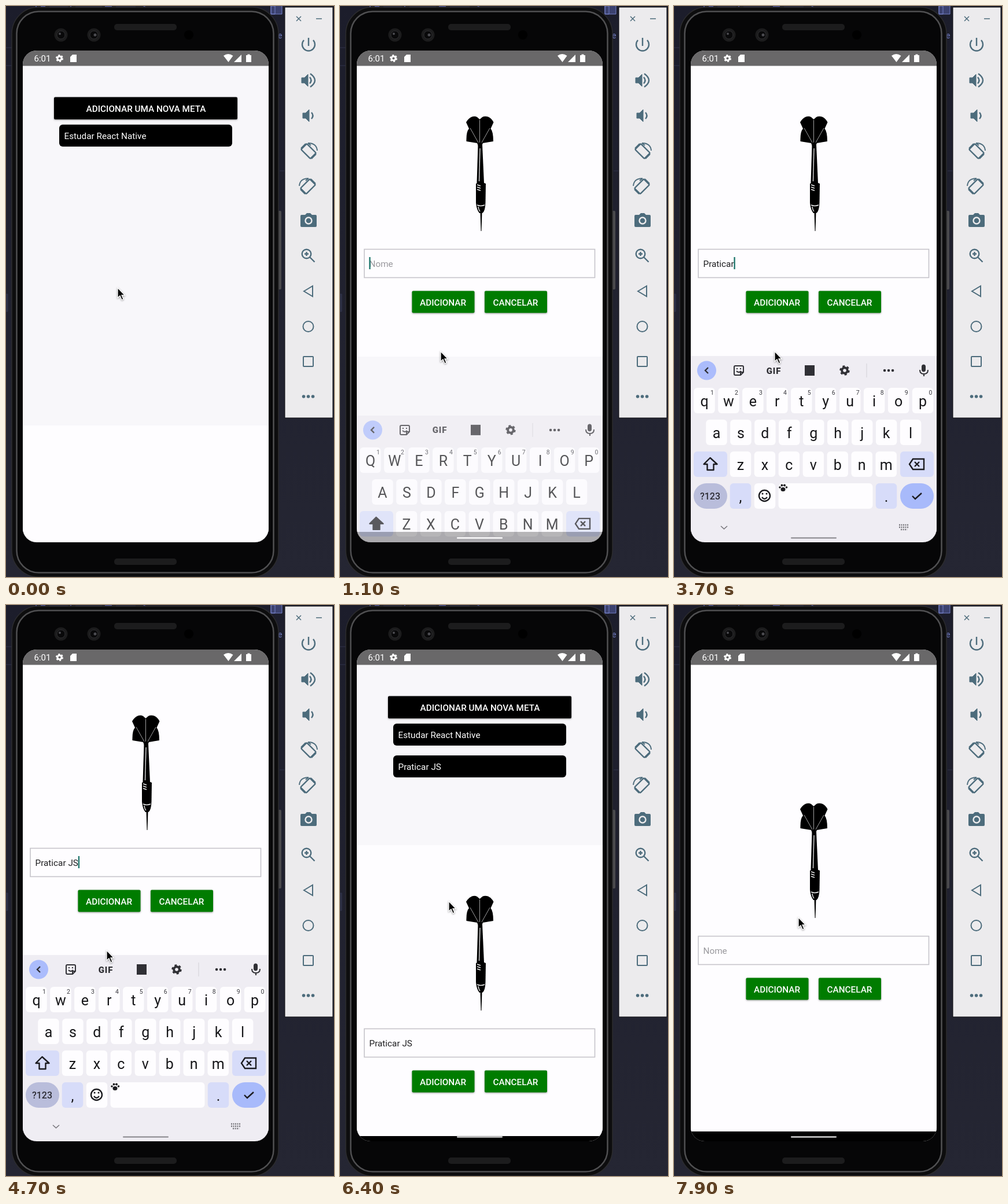
An HTML page for the animation above (8000 ms loop, 567 px wide and 987 px high).

```html
<!DOCTYPE html>
<html lang="pt">
<head>
<meta charset="utf-8">
<style>
html,body{margin:0;width:100%;height:100%;overflow:hidden;background:#20212e}
svg{display:block;width:567px;height:987px;font:15.3px Roboto,sans-serif}
text{white-space:pre}
.mid{text-anchor:middle}
.btn{font-weight:500;fill:#fff;text-anchor:middle}
.line{fill:none;stroke-width:2.4}
.thin{stroke-width:2}
.shade{filter:drop-shadow(0 1px 1.5px #0006)}
</style>
</head>
<body>
<svg viewBox="0 0 567 987">
<defs>
  <clipPath id="glass"><rect x="29" y="77" width="425" height="850" rx="24"/></clipPath>
  <linearGradient id="desk" x2="0" y2="1"><stop stop-color="#1c1d2b"/><stop offset="1" stop-color="#252633"/></linearGradient>
  <g id="gear"><circle r="4.8" fill="none" stroke-width="4"/><circle r="7.4" fill="none" stroke-width="2.6" stroke-dasharray="3.9 3.85"/></g>
  <g id="turn" class="line">
    <rect x="-7" y="-11.500" width="14" height="23" rx="2" transform="rotate(-45)"/>
    <path d="M-12.500-4.500l8-8M4.500 12.500l8-8" stroke-width="3.500"/>
    <path d="M-1-14Q14-14 15-1M-1-14l5 4" stroke-width="1.800"/>
  </g>
</defs>

<!-- desktop and phone body -->
<rect width="567" height="987" fill="url(#desk)"/>
<path d="M0 72H10M0 103H10M0 498H3V528H0M473 285h9" stroke="#30334a" fill="#2b2e42"/>
<path d="M52 0v3M60 1h8M75 2h32M112 0v3M120 2h46M171 1h12M190 2h34M238 0l4 3" stroke="#4c559e" stroke-width="2"/>
<path d="M458-1h19v15h-19zM458 0h7v14h-7z" fill="#5966b4" fill-opacity=".5" stroke="#7480c8"/>
<text x="470" y="56" fill="#7480c8" font-size="14">e</text>
<rect x="470" y="354" width="6" height="136" rx="2" fill="#4a4a4d"/>
<g fill="#060607">
  <rect x="10" y="2" width="461" height="985" rx="46" fill="#0d0d0e" stroke="#2c2c2e" stroke-width="1.500"/>
  <rect x="18.500" y="9.500" width="444" height="970" rx="38" stroke="#505052" stroke-width="2.500"/>
</g>
<g fill="#1c1c1d">
  <rect x="187" y="31" width="108" height="11" rx="5"/>
  <rect x="187" y="955" width="108" height="11" rx="5"/>
  <circle cx="95" cy="50" r="11.500"/><circle cx="152" cy="50" r="11.500"/>
</g>
<g fill="#09090a" stroke="#303033">
  <circle cx="95" cy="50" r="7"/><circle cx="152" cy="50" r="7"/>
</g>
<g fill="#4b4b50"><circle cx="93" cy="48" r="2"/><circle cx="154" cy="50" r="2.500"/></g>
<circle cx="316" cy="50" r="8" fill="#000"/>

<!-- phone screen -->
<g clip-path="url(#glass)">
  <rect x="29" y="77" width="425" height="850" fill="#f8f7fa"/>
  <rect class="shade" x="83" y="157.500" width="317" height="38.500" rx="2"/>
  <text class="btn" x="242" y="183">ADICIONAR UMA NOVA META</text>
  <rect x="92" y="205" width="299" height="38" rx="6"/>
  <text x="100.500" y="230" fill="#fff">Estudar React Native</text>
  <g id="added">
    <rect x="92" y="260" width="299" height="38" rx="6"/>
    <text x="100.500" y="285" fill="#fff">Praticar JS</text>
  </g>
  <rect x="29" y="909" width="425" height="18"/>
  <rect id="listPill" x="202" y="918.500" width="79" height="2" rx="1" fill="#fff"/>

  <g id="modal">
    <rect id="sheet" x="29" y="103" width="425" fill="#fefdff"/>
    <g id="form">
      <path d="M218 201Q222 194 228 191.500Q233 190 237 192L241.500 196L246 192Q250 190 256 191.500Q262 194 265.500 201L260.500 212Q265 217 265 234L247 237L245 242H239L237 237L218.500 234Q218 217 223 212Z"/>
      <path d="M241.500 197V236M225 211L239 236M259 211L245 236" stroke="#c9c9cb" stroke-width=".8"/>
      <path d="M238.500 240H246L249 306H236.500Z"/>
      <path d="M242 246L240.500 303" stroke="#eee" stroke-width="1.300"/>
      <path d="M235 307Q243 302 252 307L251.500 340Q251 355 246 358H241Q236 352 235 340Z"/>
      <path d="M237 309l6 2M237 313l6 2M237 317l6 2M237 344q6 3 13 0M239 347q1 6 3 8" fill="none" stroke="#eee" stroke-width="1.500"/>
      <path d="M242.500 357H245.500L244.500 389H243.500Z"/>
      <rect x="42" y="420.500" width="398.500" height="49" fill="#fefdff" stroke="#c5c4ca" stroke-width="1.600"/>
      <text id="field" x="50.500" y="451"></text>
      <rect id="caret" y="434" width="2.400" height="21" fill="#22796f"/>
      <g fill="#007c00" class="shade">
        <rect x="124.500" y="492.500" width="108" height="38" rx="2"/>
        <rect x="250" y="492.500" width="108" height="38" rx="2"/>
      </g>
      <text class="btn" x="178" y="518">ADICIONAR</text>
      <text class="btn" x="303.500" y="518">CANCELAR</text>
    </g>
  </g>

  <g id="keyboard">
    <rect x="29" y="605" width="425" height="340" fill="#efedf3"/>
    <circle cx="56.500" cy="630" r="16.500" fill="#abbcfc"/>
    <g fill="#303035" stroke="#303035">
      <path class="line" d="M59 625l-5 5 5 5"/>
      <path class="line thin" d="M106 622h12q2 0 2 2v9l-5 5h-9q-2 0-2-2v-12q0-2 2-2M120 633h-5v5M108 631q4 4 8 0"/>
      <path d="M108 626h2v2h-2zM114 626h2v2h-2z" stroke="none"/>
      <text class="mid" x="172.500" y="635.500" font-size="15" font-weight="900" letter-spacing=".8" stroke="none">GIF</text>
      <rect x="226" y="621" width="17" height="18" stroke="none"/>
      <use href="#gear" x="295" y="630"/>
      <path d="M333 618v24" stroke="#d2d1d7"/>
      <path d="M364 630h.1M371 630h.1M378 630h.1" stroke-width="4.500" stroke-linecap="round"/>
      <rect x="428.500" y="620" width="6" height="12" rx="3"/>
      <path class="line thin" d="M425 629q0 7 7 7t7-7M432 636v4"/>
    </g>
    <g id="keys"></g>
    <g class="line" stroke="#1c1c20">
      <path id="shift" d="M62.500 781l-11 11h6v10h11v-10h6z" stroke-linejoin="round"/>
      <path d="M413 783h19v18h-19l-6-9zM416 788l8 8M424 788l-8 8"/>
      <circle cx="156.500" cy="846.500" r="9.500"/>
      <path d="M152 849q4.500 6 9 0"/>
      <path d="M153 843h.1M160 843h.1" stroke-width="3" stroke-linecap="round"/>
      <path d="M412 847l5 5 11-10"/>
      <path d="M81 899l5.500 5 5.500-5" stroke="#77767b" stroke-width="1.600"/>
      <path d="M389 897h17M389 901h17M392 905h11" stroke="#77767b" stroke-dasharray="2 1.500"/>
    </g>
    <g fill="#1c1c20">
      <ellipse cx="188.500" cy="835.500" rx="4" ry="3.500"/>
      <circle cx="183" cy="832" r="1.800"/><circle cx="186.500" cy="828.500" r="2"/>
      <circle cx="191" cy="828.500" r="2"/><circle cx="194.500" cy="832" r="1.800"/>
    </g>
  </g>
  <rect id="pill" x="202" y="918.500" width="79" height="2" rx="1"/>

  <!-- status bar -->
  <rect x="29" y="77" width="425" height="26.500" fill="#696869"/>
  <g fill="#fff">
    <text x="48.500" y="96" font-size="15">6:01</text>
    <use href="#gear" transform="translate(92.500 90.500) scale(.75)" stroke="#fff"/>
    <path d="M115 84h7v13h-11v-9z"/>
    <path d="M376 86q8-6 16.500 0L384.500 97zM407 84v13h-13zM415 85h2.500v-1.500h4V85h2.500v12h-9z"/>
  </g>
</g>

<!-- emulator controls -->
<rect x="482" y="2" width="83" height="710" fill="#ecebed" stroke="#0c0c10"/>
<g stroke="#4d6c7c" fill="#4d6c7c">
  <path d="M502 18l8 8M510 18l-8 8M536 22h10" stroke-width="1.500"/>
  <path class="line" d="M523 55v14M515 59a11 11 0 1 0 16 0"/>
  <path d="M511 124h5l6-6v21l-6-6h-5z"/>
  <path class="line" d="M525 123q5 5.500 0 11M526 117q16 11.500 0 23"/>
  <path d="M513 185h5l6-6v21l-6-6h-5z"/>
  <path class="line" d="M528 184q5 5.500 0 11"/>
  <use href="#turn" x="523" y="251"/>
  <use href="#turn" transform="translate(522 312) scale(-1 1)"/>
  <path d="M511 361h6l3-3h6l3 3h6q2 0 2 2v17q0 2-2 2h-24q-2 0-2-2v-17q0-2 2-2" stroke="none"/>
  <circle class="line" cx="523" cy="371" r="5.500" style="stroke:#ecebed"/>
  <circle class="line" cx="519.500" cy="428.500" r="7.800"/>
  <path class="line" d="M525 434l8.500 8.500M516 428.500h7M519.500 425v7"/>
  <path class="line thin" d="M515 493l15-9v18z"/>
  <circle class="line thin" cx="522.500" cy="554" r="9"/>
  <rect class="line thin" x="514" y="606" width="17" height="17" rx="1"/>
  <path d="M514.500 675h.1M522.500 675h.1M530.500 675h.1" stroke-width="5.500" stroke-linecap="round"/>
</g>
<path id="pointer" d="M0 0V17.500L4 13.800L7.200 21L10 19.700L7 13H12.500Z" stroke="#fff" stroke-width="1.300" class="shade"/>
</svg>

<script>
const $ = id => document.getElementById(id);
const PITCH = 41.95;

const key = (x, y, w, fill, label = '', radius = 6) =>
  `<rect x="${x - w / 2}" y="${y}" width="${w}" height="44" rx="${radius}" fill="${fill}"/>` +
  `<text class="mid letter" x="${x}" y="${y + 32}" font-size="25" fill="#161619">${label}</text>`;

const row = (letters, x, y) => [...letters].map((c, i) => key(x + i * PITCH, y, 36.5, '#fefdff', c)).join('');
const digits = [...'1234567890'].map((d, i) =>
  `<text class="mid" x="${66 + i * PITCH}" y="672" font-size="10.500" fill="#3a3a40">${d}</text>`).join('');

$('keys').innerHTML = row('qwertyuiop', 52.5, 660) + digits + row('asdfghjkl', 73.5, 715) +
  row('zxcvbnm', 115, 770) + key(63, 770, 58, '#d7dcf9') + key(420, 770, 58, '#d7dcf9') +
  key(63, 825, 58, '#b9bddb', '', 22) + key(115, 825, 36.5, '#d7dcf9', ',') +
  key(157, 825, 36.5, '#fefdff') + key(262, 825, 163, '#fefdff') +
  key(367, 825, 36.5, '#d7dcf9', '.') + key(420, 825, 58, '#a8bafb', '', 22) +
  '<text class="mid" x="62.500" y="853" font-size="16" font-weight="500" fill="#2c2c34">?123</text>';
const letters = [...document.querySelectorAll('.letter')].filter(e => e.textContent);
letters.forEach(e => e.dataset.c = e.textContent);

const PHRASE = 'Praticar JS ';
const TYPED = [2100, 2300, 2500, 2750, 2950, 3150, 3350, 3600, 3950, 4300, 4500, 4720];
const FOCUS = 1000, SUBMIT = 6229, REOPEN = 7200, STEP = 100;
const PATH = [[-130, 210, 330], [0, 193, 487], [450, 174, 597], [5300, 174, 597], [5800, 244, 515],
  [6080, 188, 512], [6500, 188, 512], [6950, 222, 178], [7250, 222, 178], [7800, 215, 540], [8000, 215, 540]];

const progress = (t, start, span) => Math.min(1, Math.max(0, (t - start) / span));
const smooth = p => (1 - Math.cos(Math.PI * p)) / 2;

function pointerAt(t) {
  const i = PATH.findIndex(p => p[0] > t);
  const [a, b] = [PATH[i - 1], PATH[i]];
  const e = smooth(progress(t, a[0], b[0] - a[0]));
  return [a[1] + (b[1] - a[1]) * e, a[2] + (b[2] - a[2]) * e];
}

function draw(t) {
  const slide = start => smooth(progress(t, start, 400));
  const hidden = t < SUBMIT ? 1 - slide(-127) : t < REOPEN ? slide(SUBMIT) : 1 - slide(REOPEN);
  const compact = t >= FOCUS + 30 && t < REOPEN;
  $('modal').setAttribute('transform', `translate(0 ${Math.round(807 * hidden)})`);
  $('modal').style.display = hidden === 1 ? 'none' : '';
  $('sheet').setAttribute('height', compact ? 503 : 807);
  $('form').setAttribute('transform', `translate(0 ${compact ? 0 : 152})`);
  $('added').style.display = t >= SUBMIT ? '' : 'none';

  const count = t < REOPEN ? TYPED.filter(k => k <= t).length : 0;
  $('field').textContent = count ? PHRASE.slice(0, count) : 'Nome';
  $('field').setAttribute('fill', count ? '#1e1e20' : '#99989d');
  const focused = t >= FOCUS && t < SUBMIT;
  const since = t - (count ? TYPED[count - 1] : FOCUS);
  $('caret').style.display = focused && since % 1000 < 500 ? '' : 'none';
  $('caret').setAttribute('x', 50.3 + (count ? $('field').getComputedTextLength() : 0));

  const rise = t < SUBMIT ? 1 - (1 - progress(t, FOCUS, 560)) ** 5.8 : 1 - smooth(progress(t, SUBMIT - 29, 190));
  const shown = t < SUBMIT ? progress(t, FOCUS - 40, 195) : rise;
  $('keyboard').style.display = rise > 0 ? '' : 'none';
  $('keyboard').setAttribute('transform', `translate(0 ${322 * (1 - rise)})`);
  $('keyboard').setAttribute('opacity', shown);
  const upper = count === 0;
  letters.forEach(e => e.textContent = upper ? e.dataset.c.toUpperCase() : e.dataset.c);
  $('shift').style.fill = upper ? '#1c1c20' : 'none';
  $('pill').style.display = rise > 0 ? '' : 'none';
  $('pill').setAttribute('fill', shown < 1 ? '#fff' : '#858489');

  $('pointer').setAttribute('transform', `translate(${pointerAt(t)})`);
}

const begin = performance.now();
function tick(now) {
  const t = Math.max(0, now - begin) + 8;
  draw(Math.floor(t / STEP) * STEP % 8000);
  requestAnimationFrame(tick);
}
draw(0);
requestAnimationFrame(tick);
</script>
</body>
</html>
```
